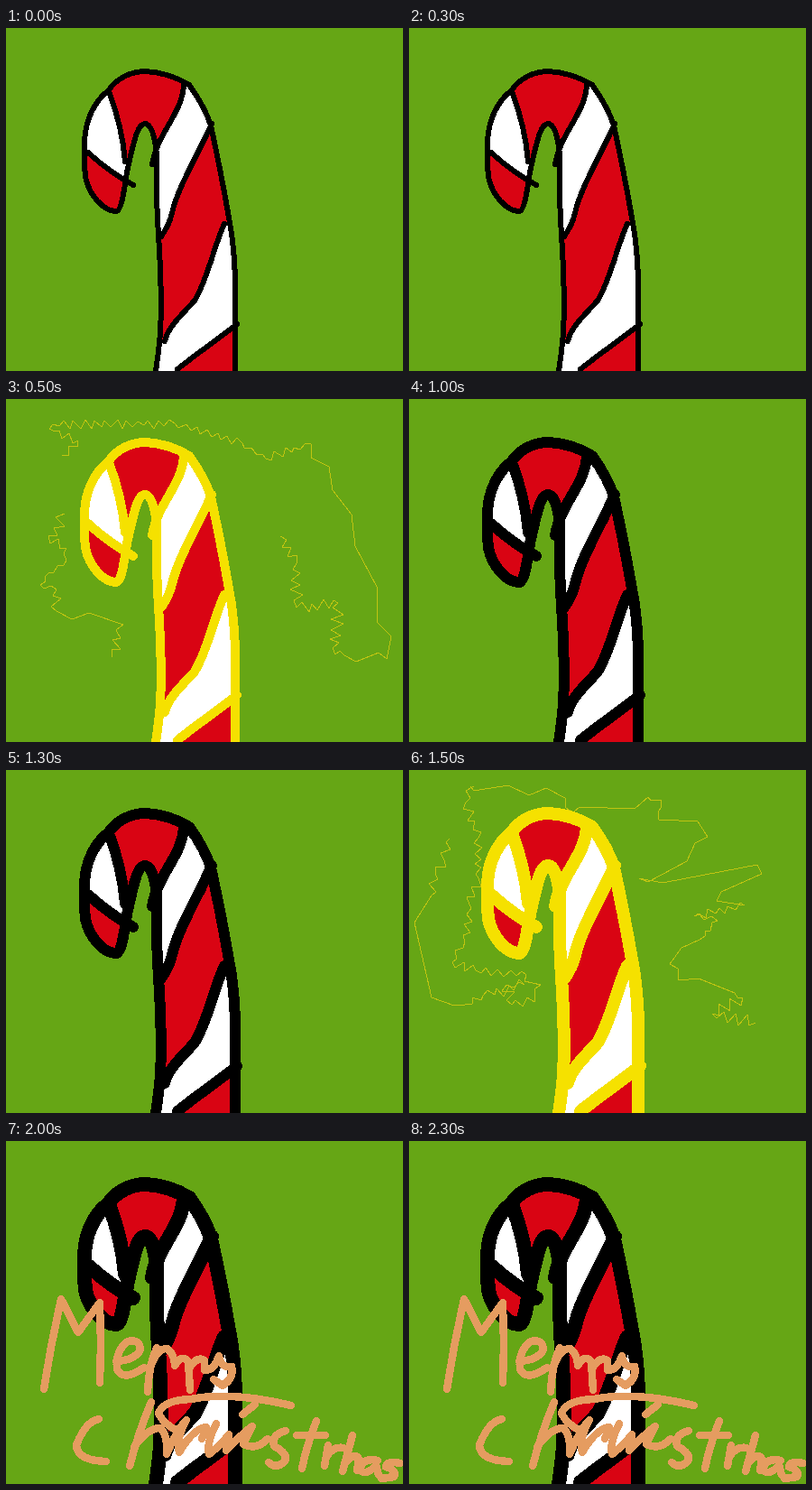
Recreate the animation shown at these times as an HTML page. Size 440x380 px, loop 2.5 s.

```html
<!DOCTYPE html>
<html lang="en">
<head>
<meta charset="utf-8">
<title>Candy cane</title>
<style>
  html, body { margin: 0; width: 100%; height: 100%; overflow: hidden; background: #66a615; }
  svg { display: block; width: 440px; height: 380px; shape-rendering: crispEdges; }
  .line { fill: none; stroke-linecap: round; stroke-linejoin: round; }
  .ink { animation: ink 2.5s step-end infinite; }
  .spark { stroke: #c0c412; stroke-width: 1; visibility: hidden; }
  .spark.a { animation: sparkA 2.5s step-end infinite; }
  .spark.b { animation: sparkB 2.5s step-end infinite; }
  .note { stroke: #e59c60; stroke-width: 8.5; visibility: hidden; animation: note 2.5s step-end infinite; }
  @keyframes ink {
    0%   { stroke: #000; stroke-width: 6px; }
    20%  { stroke: #f5e100; stroke-width: 10px; }
    40%  { stroke: #000; stroke-width: 12px; }
    60%  { stroke: #f5e100; stroke-width: 14px; }
    80%, 100% { stroke: #000; stroke-width: 16px; }
  }
  @keyframes sparkA { 0% { visibility: hidden; } 20% { visibility: visible; } 40%, 100% { visibility: hidden; } }
  @keyframes sparkB { 0% { visibility: hidden; } 60% { visibility: visible; } 80%, 100% { visibility: hidden; } }
  @keyframes note { 0% { visibility: hidden; } 80%, 100% { visibility: visible; } }
</style>
</head>
<body>
<svg viewBox="0 0 440 380" role="img" aria-label="Merry Christmas candy cane">
  <defs>
    <path id="cane" d="M166 380C168 365 171 350 171.500 325C173 270 169 240 167.500 200L167 140C165 120 161 106 154 106C147 106 143 118 134 160C131 180 128 203 122 203C108 203 92 185 88 165C86 145 86 125 89 110C93 92 103 77 113 70C122 56 138 48 155 48C172 49 190 55 203 63C213 77 222 92 227 108C234 140 240 170 247 210C252 235 254 260 254 290V390"/>
    <clipPath id="body"><use href="#cane"/></clipPath>
  </defs>
  <rect width="440" height="380" fill="#66a615"/>

  <use href="#cane" fill="#d90413"/>
  <g fill="#fff" clip-path="url(#body)">
    <path d="M114 70Q129 110 132 148L141 174Q115 160 91 138H70V70Z"/>
    <path d="M197 62C196 95 168 115 162 151L160 240 172 231Q181 218 184 205C190 177 214 138 228 106L240 60Z"/>
    <path d="M242 217C231 240 223 280 209 302C195 318 180 330 176 347L160 345V380H190C215 358 235 345 256 328L262 217Z"/>
  </g>

  <!-- data-rough: zigzag height added to each line -->
  <g class="line spark a">
    <path data-rough="5" d="M62 62L80 46 54 36 52 28 187 27"/>
    <path data-rough="4" d="M187 27L262 49 288 66 338 50"/>
    <path d="M338 50V65L358 75 362 101 383 128 387 163 411 208V247L427 263 422 288 413 281 388 291 375 284"/>
    <path data-rough="6" d="M375 284L365 283 368 226 322 231 322 182 304 152"/>
    <path data-rough="6" d="M65 127L49 160 67 165"/>
    <path data-rough="3" d="M67 165L64 184 48 192 38 206 56 211"/>
    <path data-rough="5" d="M56 211L56 235"/>
    <path d="M56 235L73 244 92 237 130 250"/>
    <path data-rough="6" d="M130 250L117 286"/>
  </g>
  <g class="line spark b">
    <path data-rough="5" d="M68 18L78 22"/>
    <path d="M78 22L110 17 133 28 152 20 173 31 174 42 182 47 189 41 250 43 265 30"/>
    <path data-rough="5" d="M265 30L280 41 277 55"/>
    <path d="M277 55L320 57 331 74 317 81 308 101 265 124 255 120 281 125 386 105 391 115 346 135 341 145 372 150"/>
    <path data-rough="4" d="M372 150L316 162 342 167 322 188"/>
    <path d="M322 188L302 197 289 215 298 220 299 233 321 231 361 247"/>
    <path data-rough="6" d="M361 247L370 252 336 270 384 280"/>
    <path data-rough="5" d="M72 18L63 36 77 75 77 120 67 149 62 190 48 213 74 222 130 227"/>
    <path d="M130 227L128 234 146 238 140 242 139 257"/>
    <path data-rough="6" d="M139 257L114 260 108 238 128 238 82 250 62 260"/>
    <path d="M62 260L50 261 25 252 6 169 25 139"/>
    <path data-rough="5" d="M25 139L29 115 39 100 45 76"/>
  </g>

  <g class="line ink">
    <use href="#cane"/>
    <path d="M114 70Q129 110 132 148"/>
    <path d="M197 62C196 95 168 115 162 151"/>
    <path d="M91 138Q115 160 141 174"/>
    <path d="M228 106C214 138 190 177 184 205Q181 218 172 231"/>
    <path d="M242 217C231 240 223 280 209 302C195 318 180 330 176 347"/>
    <path d="M256 328C235 345 215 358 190 378"/>
  </g>

  <!-- handwritten "Merry Christmas" -->
  <g class="line note">
    <path d="M42 275L50 228 61 175 80 212 104 179 105 225 104 268"/>
    <path d="M122 244Q143 243 149 231 148 219 135 222 121 232 123 253 130 267 153 251"/>
    <path d="M167 229Q158 250 157 278M159 252Q168 229 179 230 187 237 187 249"/>
    <path d="M187 249Q194 236 202 244L204 276M203 252Q211 238 220 243L220 254Q231 254 236 238"/>
    <path d="M236 238Q238 252 250 250 253 263 240 271L230 264"/>
    <path d="M103 308Q88 311 78 337 79 354 111 355"/>
    <path d="M137 360Q147 322 161 289M142 339Q157 318 171 318 180 327 178 347"/>
    <path d="M178 347Q190 319 200 309M192 322Q176 315 169 302 174 287 205 286 250 277 316 293"/>
    <path d="M200 309Q188 330 192 345 207 319 222 317L217 330M233 313Q222 335 225 347 240 335 247 325"/>
    <path d="M247 325L244 343Q262 324 273 316M262 303L276 292M273 316L263 336Q278 343 290 330"/>
    <path d="M310 321Q293 326 297 338 313 346 309 355 299 364 291 356"/>
    <path d="M344 310Q333 338 328 363M322 326H354"/>
    <path d="M357 337L353 360M355 350Q362 338 374 340"/>
    <path d="M384 326L373 366M376 357Q386 344 391 352L389 365"/>
    <path d="M412 354Q397 350 392 363 398 373 410 359L413 370M437 357Q422 354 421 361 434 365 430 372L416 374"/>
  </g>
</svg>
<script>
  let seed = 7;
  const rand = () => (seed = seed * 16807 % 2147483647) / 2147483647;

  // Split each leg into short steps that swing from side to side.
  function roughen(path) {
    const amp = +path.dataset.rough;
    const nums = path.getAttribute('d').match(/\d+/g).map(Number);
    const out = [[nums[0], nums[1]]];
    let side = 1;
    for (let i = 2; i < nums.length; i += 2) {
      const [x0, y0, x1, y1] = nums.slice(i - 2, i + 2);
      const dx = x1 - x0, dy = y1 - y0, len = Math.hypot(dx, dy);
      const steps = Math.max(2, Math.round(len / 6));
      for (let k = 1; k < steps; k++) {
        const t = (k + rand() * 0.6 - 0.3) / steps;
        const off = side * amp * (0.4 + 0.8 * rand()) / len;
        out.push([x0 + dx * t - dy * off, y0 + dy * t + dx * off]);
        side = -side;
      }
      out.push([x1, y1]);
    }
    path.setAttribute('d', 'M' + out.map(p => p.map(Math.round).join(' ')).join('L'));
  }
  document.querySelectorAll('[data-rough]').forEach(roughen);
</script>
</body>
</html>
```
